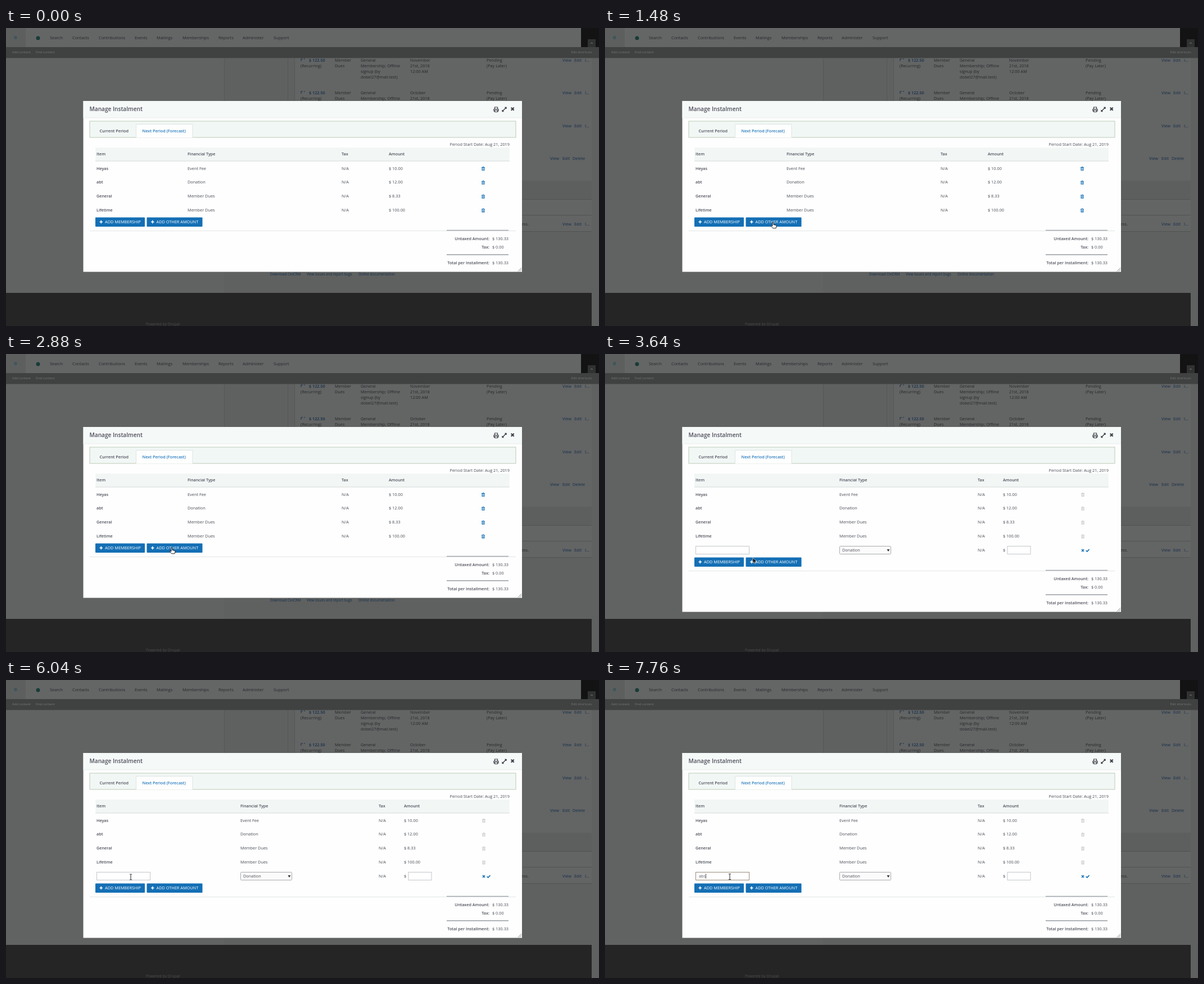
Animation of 1055x531 px, one loop 8 s. Source, as an HTML page:

```html
<!DOCTYPE html>
<html lang="en">
<head>
<meta charset="utf-8">
<title>Manage Instalment</title>
<style>
html, body { margin: 0; width: 100%; height: 100%; overflow: hidden; background: #5f6060; }
svg { display: block; width: 100vw; height: 100vh; font-family: "Open Sans", sans-serif; }
text { white-space: pre; }
</style>
</head>
<body>
<svg id="stage" viewBox="0 0 1055 531" preserveAspectRatio="none"></svg>
<script>
const INK = '#4d4d59', BLUE = '#146fb5', DIM = '#25282a', LINK = '#15304a';

const rect = (x, y, w, h, fill, more = '') =>
  `<rect x="${x}" y="${y}" width="${w}" height="${h}" fill="${fill}" ${more}/>`;
const path = (d, stroke, width = 1, fill = 'none') =>
  `<path d="${d}" stroke="${stroke}" stroke-width="${width}" fill="${fill}"/>`;
// y is the vertical middle of the line
const text = (x, y, s, fill = INK, size = 7.35, more = '') =>
  `<text x="${x}" y="${y + size * 0.36}" font-size="${size}" fill="${fill}" ${more}>${s}</text>`;
const bold = (x, y, s, fill = INK, size = 7.25, more = '') =>
  text(x, y, s, fill, size, 'font-weight="600" ' + more);
const lines = (x, y, list) => list.map((s, i) => text(x, y + i * 10.2, s, DIM, 7.3)).join('');

function page() {
  const menu = [[78, 'Search'], [118, 'Contacts'], [165, 'Contributions'], [229, 'Events'], [268, 'Mailings'],
    [314, 'Memberships'], [378, 'Reports'], [421, 'Administer'], [476, 'Support']];
  const due = (y, date) =>
    path(`M525 ${y + 2}v-4h3m2 0h2`, LINK) + bold(539, y, '$ 122.50', LINK) +
    lines(524, y + 10.2, ['(Recurring)']) + lines(585, y, ['Member', 'Dues']) +
    lines(631, y, ['General', 'Membership; Offline', 'signup (by', 'dobel27@mail.test)']) +
    lines(719, y, date) + lines(855, y, ['Pending', '(Pay Later)']);
  const actions = y => text(990, y, 'View', LINK) + text(1011, y, 'Edit', LINK) + text(1030, y, 'I...', LINK);
  return rect(0, 0, 1055, 531, '#5f6060') +
    rect(0, 53, 388, 419, '#616262') + rect(513, 53, 529, 310, '#636464') +
    rect(918, 272, 124, 33, '#5d5e5e') +
    path('M388.5 53V130M501.5 53V130M513.5 53V130', '#555656') +
    path('M918 305.5H1042M918 333.5H1042M918 362.5H1042', '#525353') +
    due(57, ['November', '21st, 2018', '12:00 AM']) +
    due(115, ['October', '21st, 2018', '12:00 AM']) +
    [57, 115, 174, 349].map(actions).join('') +
    text(968, 232, 'View', LINK) + text(990, 232, 'Edit', LINK) + text(1008, 232, 'Delete', LINK) +
    text(917, 349, 'ess.', DIM) +
    text(470, 439, 'Download CiviCRM', LINK, 6.2) +
    text(535, 439, 'View issues and report bugs', LINK, 6.2) +
    text(627, 439, 'Online documentation', LINK, 6.2) +
    rect(0, 472, 1042, 59, '#252525') +
    text(249, 528, 'Powered by Drupal', '#4c4d4d', 6.8) +
    rect(0, 0, 1023, 34, '#646666') + rect(0, 0, 35, 34, '#5d5f5f') +
    '<circle cx="17" cy="17" r="3" fill="#41565c"/><circle cx="57" cy="18" r="3.5" fill="#173c36"/>' +
    menu.map(([x, s]) => text(x, 17, s, DIM)).join('') +
    rect(0, 34, 1055, 19.5, '#404141') +
    text(11, 43, 'Add content', '#777', 5.8) + text(53, 43, 'Find content', '#777', 5.8) +
    text(1005.5, 43, 'Edit shortcuts', '#777', 5.8) +
    rect(1023, 0, 32, 34, '#131313') + rect(1035, 20, 14, 14, '#303131') +
    path('M1040 28l2-2 2 2', '#777');
}

function shell(height) {
  return rect(137.5, 130, 780.5, height, '#fdfefd') +
    rect(137.5, 130, 780.5, 30, '#f5f9f8') + path('M137.5 160H918', '#e9eeec') +
    bold(148.5, 144.7, 'Manage Instalment', INK, 10.1) +
    // print, expand, close
    path('M869.5 144v-3h5v3M869.5 148h-1.500v-3.500h8v3.500H874.500M869.500 146.500h5v3h-5z', '#3c3c46', 1.2) +
    path('M883 148.500L890 141.500M887.500 141.500H890V144M883 146V148.500H885.500', '#3c3c46', 1.3) +
    path('M898.700 141.700l5 5m0-5l-5 5', '#3c3c46', 2) +
    rect(149, 166, 758, 29, '#f1f7f5', 'stroke="#aebfa9" stroke-width=".8"') +
    rect(231.500, 171.500, 100.500, 24, '#fdfefd') +
    path('M231.500 195V171.500H332V195', '#d9e1dd', .8) +
    bold(166.500, 183.700, 'Current Period') + bold(242.500, 183.700, 'Next Period (Forecast)', '#2579bf') +
    text(896, 207, 'Period Start Date: Aug 21, 2019', INK, 7.35, 'text-anchor="end"') +
    rect(159, 213, 737, 24, '#f2f7f5') + path('M159 237H896', '#d5dbd8') +
    path(`M911 ${129 + height}l6-6m-3 6l3-3`, '#777', .9);
}

function table(fin, tax, amount, binX, binColor) {
  const rows = [['Heyas', 'Event Fee', '10.00'], ['abt', 'Donation', '12.00'],
    ['General', 'Member Dues', '8.33'], ['Lifetime', 'Member Dues', '100.00']];
  const bin = y => path(`M${binX - 3} ${y - 2}h6M${binX - 1} ${y - 3}h2`, binColor) +
    path(`M${binX - 2} ${y - 2}v5h4v-5M${binX} ${y - 1}v3`, binColor, 1.1);
  return bold(161, 224.500, 'Item') + bold(fin, 224.500, 'Financial Type') +
    bold(tax, 224.500, 'Tax') + bold(amount, 224.500, 'Amount') +
    rows.map(([item, type, sum], i) => {
      const y = 250 + i * 24.800;
      return bold(161, y, item) + text(fin, y, type) + text(tax, y, 'N/A') +
        text(amount, y, '$ ' + sum) + bin(y + .5);
    }).join('');
}

function bottom(shift) {
  const button = (x, w, s) => rect(x, 337.500, w, 16.500, BLUE, 'rx="1"') +
    path(`M${x + 7.500} 345.500h5.500m-2.750-2.750v5.500`, '#fff', 1.6) + text(x + 17, 345.800, s, '#fff');
  const total = (y, label, sum) => bold(860, y, label, INK, 7.25, 'text-anchor="end"') + text(865, y, '$ ' + sum);
  return `<g transform="translate(0 ${shift})">` +
    button(159, 88, 'ADD MEMBERSHIP') + button(250.500, 99, 'ADD OTHER AMOUNT') +
    path('M149 361.500H907', '#e3e7e6') + path('M784 360.500H894M784 403.800H894', '#a6a9b0', 1.7) +
    total(375.500, 'Untaxed Amount:', '130.33') + total(390.300, 'Tax:', '0.00') +
    total(418.300, 'Total per Installment:', '130.33') + '</g>';
}

function newRow() {
  return rect(161.500, 342.500, 95, 14, '#fff', 'id="field" stroke="#c3c7cc"') +
    text(167, 349.800, '', '#5c5c66', 7.35, 'id="typed"') +
    rect(0, 345, .8, 9, '#333', 'id="caret"') +
    rect(417.500, 342.500, 91, 14, '#fbfbfb', 'rx="1" stroke="#a9abae"') + text(422, 349.500, 'Donation') +
    path('M501.500 348h5l-2.500 4z', 'none', 0, '#333') +
    text(663, 349.500, 'N/A') + text(708, 349.500, '$') +
    rect(716, 342.500, 41, 14, '#fff', 'stroke="#c3c7cc"') +
    path('M848 348l4 4m0-4l-4 4M855.700 350l2 2 3.800-4', BLUE, 1.7);
}

const cursors =
  '<g id="arrow"><path d="M0 0V9.500L2.200 7.500L3.700 11L5.300 10.300L3.800 7H6.800Z" fill="#111" stroke="#fff" stroke-width=".6"/></g>' +
  '<g id="hand"><path d="M-1 1q0-1 1-1t1 1v3.500l4 .8q1 .3 1 1.500l-.8 4H-.3L-3.500 7q-.3-1.500 1-1L-1 7Z" fill="#fff" stroke="#111" stroke-width=".9"/></g>' +
  '<g id="beam"><path d="M-2-5H-.5L0-4.500 .5-5H2M0-4.500V4.500M-2 5H-.5L0 4.500 .5 5H2" fill="none" stroke="#222"/></g>';

const stage = document.getElementById('stage');
stage.innerHTML = page() +
  `<g id="before">${shell(304.5)}${table(323, 597, 681, 849, BLUE)}${bottom(0)}</g>` +
  `<g id="after">${shell(329.5)}${table(417, 663, 708, 850, '#c9cbcd')}${newRow()}${bottom(25)}</g>` + cursors;

const $ = id => document.getElementById(id);
const show = (id, on) => $(id).setAttribute('display', on ? 'inline' : 'none');

// pointer path: time, x, y
const track = [[80, 430, 533], [800, 330, 392], [1040, 330, 392], [1480, 299, 346], [1800, 293, 344],
  [2160, 295, 345], [3400, 295, 345], [3640, 263, 363], [4120, 268, 371], [4320, 268, 371], [4720, 276, 369],
  [5560, 276, 369], [6040, 222, 351], [6400, 222, 350.500]];

function pointer(t) {
  let i = track.findIndex(k => k[0] > t);
  if (i < 0) return track[track.length - 1].slice(1);
  if (i === 0) return track[0].slice(1);
  const [t0, x0, y0] = track[i - 1], [t1, x1, y1] = track[i];
  const u = (t - t0) / (t1 - t0), e = u * u * (3 - 2 * u);
  return [x0 + (x1 - x0) * e, y0 + (y1 - y0) * e];
}

function draw(t) {
  const open = t >= 3040, focus = t >= 6480;
  show('before', !open);
  show('after', open);

  const typed = 'abs'.slice(0, [7440, 7600, 7760].filter(k => t >= k).length);
  $('typed').textContent = typed;
  $('field').setAttribute('stroke', focus ? '#9a8c7e' : '#c3c7cc');
  show('caret', focus && (t < 6880 || t >= 7440));
  $('caret').setAttribute('x', 167 + (typed ? $('typed').getComputedTextLength() : 0));

  const [x, y] = pointer(t);
  const onButton = !open && y > 337 && y < 354 && x > 159 && x < 349.500;
  const onField = open && y > 342 && y < 357 && x > 161 && x < 257;
  const kind = onButton ? 'hand' : onField ? 'beam' : 'arrow';
  for (const id of ['arrow', 'hand', 'beam']) show(id, id === kind && t >= 80);
  $(kind).setAttribute('transform', `translate(${x} ${y})`);
}

const start = performance.now();
function tick() {
  draw((performance.now() - start) % 8000);
  requestAnimationFrame(tick);
}
tick();
</script>
</body>
</html>
```
